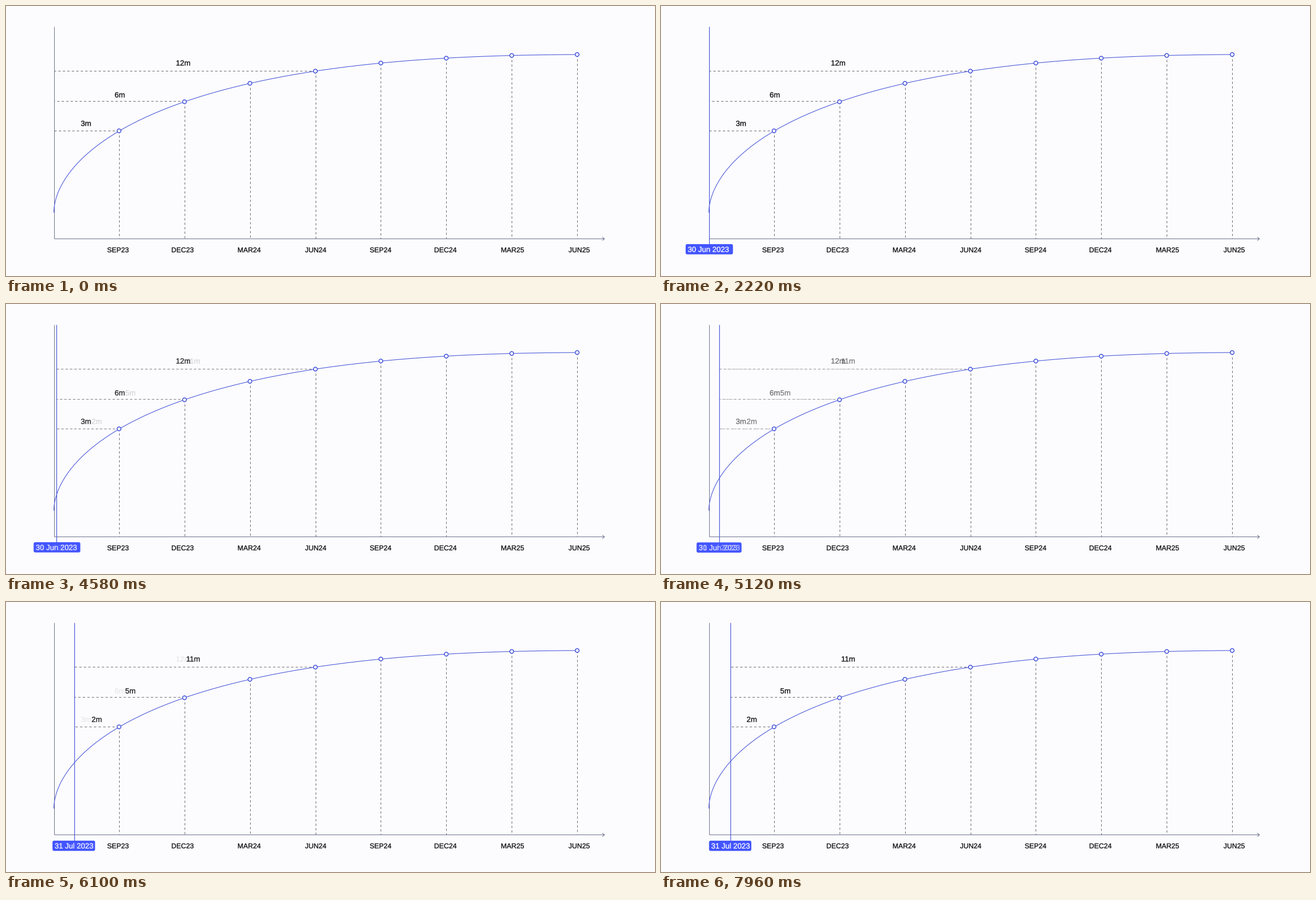
A matplotlib script for the animation above (7.98 s loop, 1159 by 483 pixels).

```python
import numpy as np
import matplotlib.pyplot as plt
from matplotlib.animation import FuncAnimation
from matplotlib.patches import Circle, FancyBboxPatch, PathPatch
from matplotlib.textpath import TextPath
from matplotlib.transforms import Affine2D

W, H = 1159, 483
LOOP, STEP = 7980, 42
BG, INK, AXIS, DASH = "#fcfcfe", "#0c0c10", "#6c718c", "#62626a"
CURVE, BLUE = "#4a58d8", "#4355ff"
LEFT, RIGHT, TOP, BASE = 85.5, 1020, 37, 416.5

fig = plt.figure(figsize=((W + 1e-6) / 72, (H + 1e-6) / 72), dpi=72, facecolor=BG)
ax = fig.add_axes([0, 0, 1, 1])
ax.set_xlim(0, W)
ax.set_ylim(H, 0)
ax.axis("off")


def ease_out(t, start, length):
    """Cubic bezier (0, 0, .58, 1) evaluated at time t."""
    s = np.linspace(0, 1, 200)
    x = 3 * (1 - s) * s**2 * 0.58 + s**3
    y = s**2 * (3 - 2 * s)
    return float(np.interp((t - start) / length, x, y))


def mix(a, b, p):
    return a + (b - a) * p


def line(xs, ys, color, width=1.0, z=2, **kw):
    return ax.plot(xs, ys, color=color, lw=width, zorder=z,
                   solid_capstyle="butt", dash_capstyle="butt", **kw)[0]


def place(patch, x, y):
    patch.set_transform(Affine2D().scale(1, -1).translate(x, y) + ax.transData)


def text(string, x, y, size, color=INK, centered=True, z=5):
    path = TextPath((0, 0), string, size=size, prop={"family": "Liberation Sans"})
    if centered:
        box = path.get_extents()
        x -= (box.x0 + box.x1) / 2
    patch = PathPatch(path, facecolor=color, edgecolor=color, lw=0.3, zorder=z)
    ax.add_patch(patch)
    place(patch, x, y)
    return patch


# Axes
line([LEFT, LEFT], [TOP, BASE], AXIS)
line([LEFT, 1068.5], [BASE, BASE], AXIS)
line([1065, 1068.5, 1065], [413.3, BASE, 419.7], AXIS)

# Growth curve: a smooth polynomial in the square root of time
px = 85 + (RIGHT - 85) * np.arange(1, 9) / 8
py = np.array([223.3, 171.3, 138.3, 116.5, 102, 93.3, 88.5, 86.8])
fit_x = np.r_[85, 104, 115.5, 124, px]
fit_y = np.r_[369.5, 311, 295, 285, py]
curve = np.polyfit(np.sqrt((fit_x - 85) / (RIGHT - 85)), fit_y, 6)
s = np.linspace(0, 1, 300)
line(LEFT + (RIGHT - LEFT) * s**2, np.polyval(curve, s), CURVE, 1.1, z=3)

# Quarter markers
quarters = ["SEP23", "DEC23", "MAR24", "JUN24", "SEP24", "DEC24", "MAR25", "JUN25"]
centers = [200, 315.5, 434.5, 553, 669, 785, 904.8, 1023.5]
for name, cx, x, y in zip(quarters, centers, px, py):
    line([x, x], [y, BASE], DASH, ls=(0, (4, 4)))
    ax.add_patch(Circle((x, y), 3.4, facecolor="white", edgecolor="#4353dc",
                        lw=1.5, zorder=4))
    text(name, cx, 440.6, 12.5)


# Horizontal spans with their captions before and after the move
class Span:
    def __init__(self, x, y, baseline, old, new):
        self.x = x
        self.rules = [line([x, LEFT], [y, y], DASH) for _ in range(2)]
        self.captions = [text(label, cx, baseline, 13.4) for label, cx in (old, new)]

    def update(self, left, p):
        for rule, caption, home, alpha in zip(self.rules, self.captions,
                                              (LEFT, END_X), (1 - p, p)):
            dash = 4 * (self.x - left) / (self.x - home)
            rule.set_xdata([self.x, left])
            rule.set_linestyle((0, (dash, dash)))
            rule.set_alpha(alpha)
            caption.set_alpha(alpha)


END_X = 124.3
spans = [
    Span(px[0], 223.5, 214.6, ("3m", 142.6), ("2m", 162)),
    Span(px[1], 170.5, 163.5, ("6m", 203.2), ("5m", 222)),
    Span(px[3], 116.5, 106.5, ("12m", 316.5), ("11m", 334.3)),
]

# Date cursor
cursor = line([LEFT, LEFT], [TOP, 428], CURVE, 1.2, z=3.5)
tag = FancyBboxPatch((44, 426), 84.5, 18.5, facecolor=BLUE, edgecolor="none", zorder=6,
                     boxstyle="round,pad=0,rounding_size=2.8")
ax.add_patch(tag)
dates = [text(d, 48, 440, 13.4, "white", centered=False, z=7)
         for d in ("30 Jun 2023", "31 Jul 2023")]


def update(i):
    t = i * STEP
    shown = ease_out(t, 0, 2000)
    p = ease_out(t, 4410, 2120)
    x = mix(LEFT, END_X, p)
    for span in spans:
        span.update(x, p)
    cursor.set_xdata([x, x])
    cursor.set_alpha(shown)
    left, top = mix(44, 85.8, p), mix(426, 427, p)
    tag.set_bounds(left, top, mix(84.5, 75.5, p), 18.3)
    tag.set_alpha(shown)
    for date, alpha in zip(dates, (1 - p, p)):
        place(date, left + 3.8, top + 14)
        date.set_alpha(alpha * shown)
    return []


anim = FuncAnimation(fig, update, frames=LOOP // STEP, interval=STEP,
                     init_func=lambda: update(0), repeat=True, repeat_delay=0)
plt.show()
```
